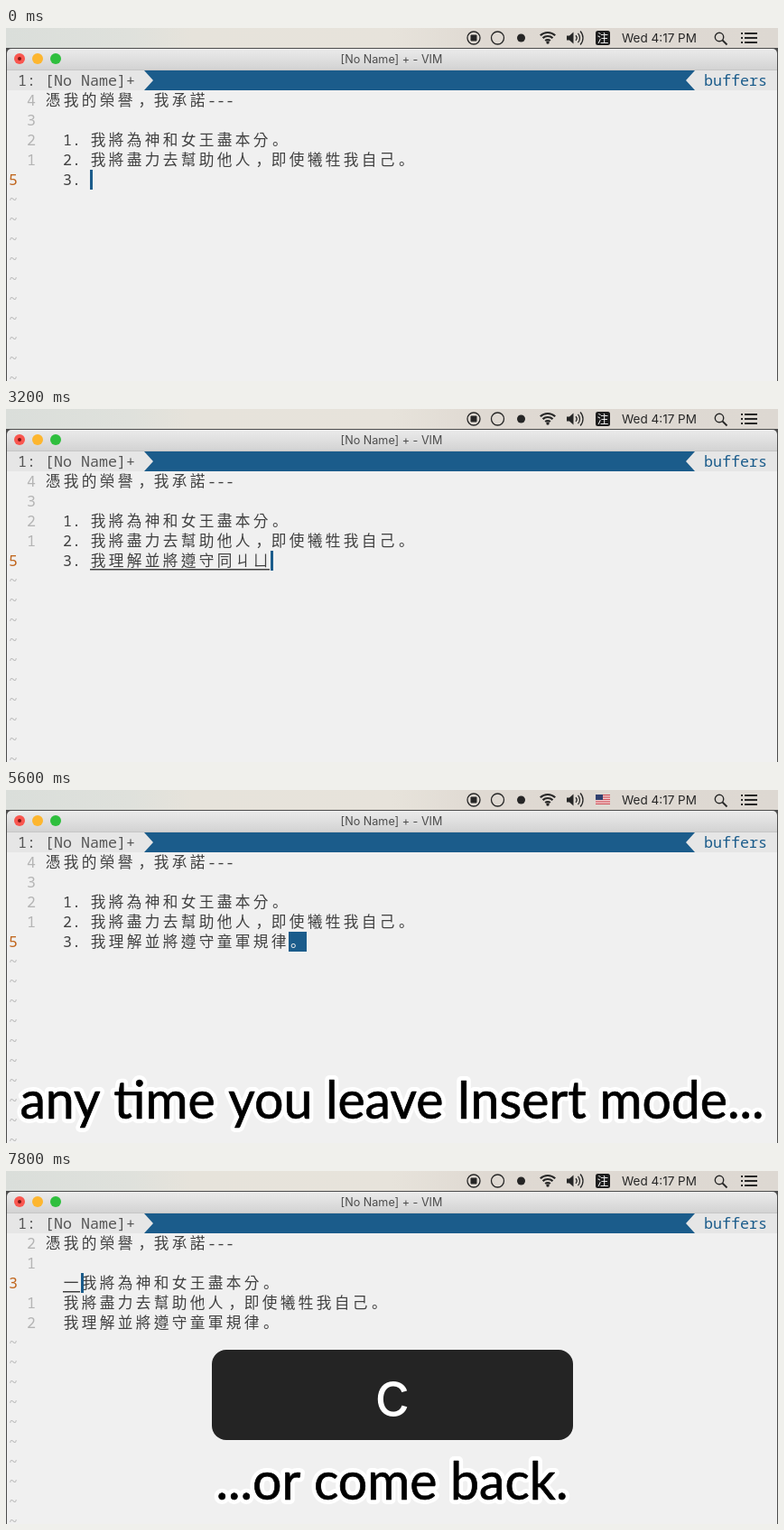
Recreate the animation shown at these times as an HTML page with a canvas. Size 855 by 391 pixels, loop 8 s.

```html
<!DOCTYPE html>
<html lang="zh-Hant">
<head>
<meta charset="utf-8">
<title>Input method switching</title>
<style>
html, body { margin: 0; width: 100%; height: 100%; overflow: hidden; background: #f0f0f0; }
canvas { display: block; width: 855px; height: 391px; }
</style>
</head>
<body>
<canvas id="stage" width="855" height="391"></canvas>
<script>
const ctx = document.getElementById('stage').getContext('2d');
const W = 855, H = 391, LOOP = 8000, STEP = 200;
const COL = 10, ROW = 22, LEFT = 43, TOP = 69;
const BLUE = '#1b5c8b', INK = '#404040', PAPER = '#f0f0f0', DARK = '#242424', ICON = '#262626';
const MONO = '16.67px "Noto Sans Mono", monospace';
const HAN = '500 16.67px "Noto Sans CJK TC", "Noto Sans CJK", sans-serif';
const MARKS = '16.67px "Noto Sans CJK SC", "Noto Sans CJK", sans-serif';
const UI = '"Inter", sans-serif';

const INTRO = '憑我的榮譽，我承諾---';
const VOWS = ['我將為神和女王盡本分。', '我將盡力去幫助他人，即使犧牲我自己。', '我理解並將遵守童軍規律。'];

// start time, typed text, number of committed characters
const TYPING = [
  [0, '', 0], [200, 'ㄨ', 0], [400, '我', 0], [600, '我ㄌ一', 0],
  [800, '我裡ㄐ一ㄝ', 0], [1000, '我理解', 0], [1200, '我理解ㄅ一', 0],
  [1400, '我理解並', 0], [1600, '我理解並ㄐ', 0], [1800, '我理解並ㄐ一ㄤ', 0],
  [2000, '我理解並將ㄗㄨ', 0], [2200, '我理解並將尊', 0], [2400, '我理解並將尊ㄕㄡ', 0],
  [2600, '我理解並將遵守', 0], [2800, '我理解並將遵守ㄊㄨ', 0], [3000, '我理解並將遵守同', 0],
  [3200, '我理解並將遵守同ㄐㄩ', 0], [3400, '我理解並將遵守童軍', 0],
  [3600, '我理解並將遵守童軍規', 9], [3800, '我理解並將遵守童軍規律', 9],
  [4000, VOWS[2], 12]
];

// start, end, text
const CAPTIONS = [
  [400, 2800, 'auto-switch input methods'],
  [3600, 6000, 'any time you leave Insert mode...'],
  [6600, 8000, '...or come back.']
];

// start, end, key label
const KEYS = [
  [4400, 4800, ''], [4800, 5600, 'esc'],
  [6800, 7200, ''], [7200, 8000, 'c']
];

const active = (list, t) => list.find(([a, b]) => t >= a && t < b);
const latest = (list, t) => list.filter(([a]) => a <= t).pop();
const rowY = r => TOP + r * ROW;
const colX = c => LEFT + c * COL;
const wide = ch => ch.charCodeAt(0) > 0x2fff;

function rect(x, y, w, h, color) {
  ctx.fillStyle = color;
  ctx.fillRect(x, y, w, h);
}

function round(x, y, w, h, r, color) {
  ctx.fillStyle = color;
  ctx.beginPath();
  ctx.roundRect(x, y, w, h, r);
  ctx.fill();
}

function disc(x, y, r, color) {
  ctx.fillStyle = color;
  ctx.beginPath();
  ctx.arc(x, y, r, 0, Math.PI * 2);
  ctx.fill();
}

function arc(x, y, r, from, to, width) {
  ctx.strokeStyle = ICON;
  ctx.lineWidth = width;
  ctx.beginPath();
  ctx.arc(x, y, r, from * Math.PI, to * Math.PI);
  ctx.stroke();
}

const ring = (x, y, r, width) => arc(x, y, r, 0, 2, width);

function poly(points, color) {
  ctx.fillStyle = color;
  ctx.beginPath();
  points.forEach(([x, y]) => ctx.lineTo(x, y));
  ctx.closePath();
  ctx.fill();
}

function label(text, x, y, font, color, align = 'left') {
  ctx.font = font;
  ctx.fillStyle = color;
  ctx.textAlign = align;
  ctx.fillText(text, x, y);
}

// Text on the terminal grid; wide characters take two columns.
function cells(text, col, row, color = INK) {
  for (const ch of text) {
    const mark = '，。'.indexOf(ch);
    const font = mark >= 0 ? MARKS : wide(ch) ? HAN : MONO;
    const shift = mark === 0 ? 3.5 : mark === 1 ? 2 : wide(ch) ? 0.7 : 0;
    label(ch, colX(col) + shift, rowY(row) + 17, font, color);
    col += wide(ch) ? 2 : 1;
  }
}

function drawMenuBar(flag) {
  const g = ctx.createLinearGradient(0, 0, W, 0);
  [[0, '#dadeda'], [0.16, '#dfe1dc'], [0.24, '#e6e3db'], [0.5, '#e7e3db'], [0.62, '#dfd9d2'], [1, '#ddd8d2']]
    .forEach(([at, color]) => g.addColorStop(at, color));
  rect(0, 0, W, 22, g);

  ring(518, 11, 7, 1.3);
  round(514.5, 7.5, 7, 7, 1, ICON);
  ring(544.5, 11, 7, 1.3);
  disc(570.5, 11, 4.5, ICON);

  [4, 8, 12].forEach(r => arc(600, 17, r, 1.26, 1.74, 2.2));
  disc(600, 16, 1.7, ICON);

  poly([[621, 8.5], [624, 8.5], [628.5, 4.5], [628.5, 17.5], [624, 13.5], [621, 13.5]], ICON);
  [4, 7.5, 11].forEach(r => arc(628, 11, r, -0.24, 0.24, 1.3));

  if (flag) drawFlag(653, 5);
  else {
    round(653, 3, 16, 16, 2.5, '#1c1c1c');
    label('注', 661, 15.6, '12.5px "Noto Sans CJK TC", "Noto Sans CJK", sans-serif', '#fff', 'center');
  }
  label('Wed 4:17 PM', 682, 16, '13.5px ' + UI, ICON);

  ring(790, 10, 4.7, 1.4);
  ctx.beginPath();
  ctx.moveTo(793.5, 13.5);
  ctx.lineTo(798.5, 18.5);
  ctx.lineWidth = 1.8;
  ctx.stroke();
  [6, 11, 16].forEach(y => {
    rect(814, y - 1, 2, 2, ICON);
    rect(818, y - 1, 14, 2, ICON);
  });
}

function drawFlag(x, y) {
  rect(x, y, 16, 11, '#fff');
  for (let i = 0; i < 7; i++) rect(x, y + i * 11 / 6.5, 16, 11 / 13, '#c8323c');
  rect(x, y, 8, 6, '#30406f');
}

function drawWindow() {
  rect(0, 22, W, H - 22, '#4c4c4c');
  const g = ctx.createLinearGradient(0, 23, 0, 46);
  g.addColorStop(0, '#ebebeb');
  g.addColorStop(1, '#d3d3d3');
  round(1, 23, W - 2, 30, 5, g);
  rect(1, 46, W - 2, 1, '#c6c6c6');
  rect(1, 47, W - 2, H - 47, PAPER);

  disc(15, 34, 6, '#f9564f');
  disc(15, 34, 2, '#7b1612');
  disc(35, 34, 6, '#fdb62f');
  disc(55, 34, 6, '#2fbf3e');
  label('[No Name] + - VIM', 427, 38.8, '12.6px ' + UI, '#4c4c4c', 'center');

  rect(1, 47, W - 2, ROW, '#e6e6e6');
  poly([[153, 47], [763, 47], [753, 58], [763, 69], [153, 69], [163, 58]], BLUE);
  cells('1: [No Name]+', -3, -1, '#555');
  cells('buffers', 73, -1, BLUE);
}

function drawNumbers(current) {
  for (let r = 0; r < 5; r++) {
    if (r === current) cells(String(r + 1), -4, r, '#c0651c');
    else cells(String(Math.abs(r - current)), -2, r, '#b4b4b4');
  }
  for (let r = 5; r < 15; r++) cells('~', -4, r, '#bcbcbc');
}

function barCursor(col, row) {
  rect(colX(col), rowY(row), 3, ROW, BLUE);
}

function block(col, row, text) {
  const width = [...text].reduce((n, ch) => n + (wide(ch) ? 2 : 1), 0);
  rect(colX(col), rowY(row), width * COL, ROW, BLUE);
  cells(text, col, row, PAPER);
}

function underline(from, to, row) {
  rect(colX(from), rowY(row) + 20, (to - from) * COL - 1, 1.5, INK);
}

function drawBuffer(t) {
  const inserted = t >= 7200;
  let row = 4;
  if (t >= 5800) row = 3;
  if (t >= 6000) row = 2;
  if (t >= 6400) row = 3;
  if (t >= 6600) row = 4;
  if (inserted) row = 2;

  drawNumbers(row);
  cells(INTRO, 0, 0);
  const [, typed, done] = latest(TYPING, t);
  const preedit = t >= 7800 ? '一' : '';
  VOWS.forEach((vow, i) => {
    const text = i === 2 ? typed : vow;
    const lead = inserted ? (i === 0 ? preedit : '') : `${i + 1}. `;
    cells(lead + text, 2, i + 2);
  });

  if (t < 4800) {
    const end = 5 + typed.length * 2;
    if (done < typed.length) underline(5 + done * 2, end, 4);
    barCursor(end, 4);
  } else if (t < 5800) block(27, 4, '。');
  else if (t < 6000) block(27, 3, VOWS[1][11]);
  else if (t < 6200) block(25, 2, '。');
  else if (t < 6400) block(2, 2, '1');
  else if (!inserted) {
    const span = t < 6800 ? 1 : t < 7000 ? 2 : 3;
    for (let r = 2; r <= row; r++) block(2, r, `${r - 1}. `.slice(0, span));
  } else {
    if (preedit) underline(2, 4, 2);
    barCursor(preedit ? 4 : 2, 2);
  }
}

// White veil with a soft oval hole around the input menu.
function drawSpotlight() {
  const g = ctx.createRadialGradient(0, 0, 0.5, 0, 0, 1);
  g.addColorStop(0, 'rgba(255,255,255,0)');
  g.addColorStop(1, 'rgba(255,255,255,0.655)');
  ctx.save();
  ctx.translate(660, 13);
  ctx.scale(62, 49);
  rect(-20, -20, 40, 40, g);
  ctx.restore();
}

function drawKey(text) {
  round(228, 198, 400, 100, 16, DARK);
  label(text, 428, 271, '69px ' + UI, '#fff', 'center');
}

function drawCaption(text) {
  const x = 427.5, y = 364;
  const outline = (width, color) => {
    ctx.lineWidth = width;
    ctx.strokeStyle = color;
    ctx.strokeText(text, x, y);
  };
  ctx.font = '57.2px "Lato", "Open Sans", sans-serif';
  ctx.textAlign = 'center';
  ctx.lineJoin = 'round';
  outline(10, '#fff');
  outline(0.7, '#000');
  ctx.fillStyle = '#000';
  ctx.fillText(text, x, y);
}

function draw(now) {
  const t = Math.floor((now % LOOP) / STEP) * STEP;
  drawMenuBar(t >= 4800 && t < 7400);
  drawWindow();
  drawBuffer(t);

  const caption = active(CAPTIONS, t);
  if (caption === CAPTIONS[0]) drawSpotlight();
  const key = active(KEYS, t);
  if (key) drawKey(key[2]);
  if (caption) drawCaption(caption[2]);
}

function tick() {
  draw(performance.now());
  requestAnimationFrame(tick);
}
tick();
</script>
</body>
</html>
```
